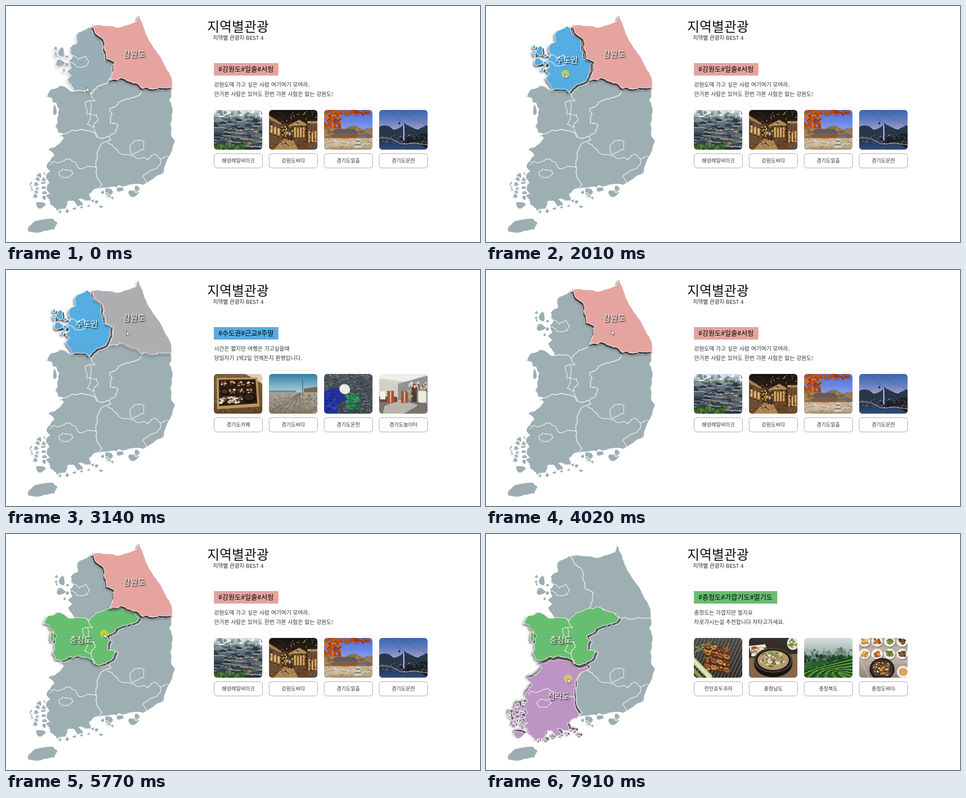
Recreate the animation shown at these times as an HTML page with a canvas. Size 1058 by 529 pixels, loop 7990 ms.

```html
<!DOCTYPE html>
<html lang="ko">
<head>
<meta charset="utf-8">
<title>지역별관광</title>
<style>
html, body { margin: 0; width: 100%; height: 100%; overflow: hidden; background: #fff; }
#stage { position: absolute; left: 0; top: 0; width: 1058px; height: 529px; overflow: hidden; }
svg { position: absolute; left: 0; top: 0; }
canvas { position: absolute; top: 233px; width: 108px; height: 89px; border-radius: 7px; }
text { font-family: "Noto Sans CJK KR", "Noto Sans CJK", "Noto Sans", sans-serif; fill: #222; }
.land { stroke: #fff; stroke-width: 1.2; stroke-linejoin: round; }
.line { fill: none; stroke: #fff; stroke-width: 1.2; stroke-linejoin: round; }
.name { font-size: 17.8px; font-weight: 500; fill: #fff; text-anchor: middle; text-shadow: 2px 2px 3px #000; }
.title { font-size: 29.9px; font-weight: 300; fill: #111; }
.tag { font-size: 15.25px; font-weight: 300; fill: #000; }
.desc { font-size: 12.2px; font-weight: 300; word-spacing: .35px; fill: #333; }
.cap { font-size: 11.4px; font-weight: 300; text-anchor: middle; fill: #333; }
</style>
</head>
<body>
<div id="stage">
  <svg id="svg" width="1058" height="529" viewBox="0 0 1058 529">
    <text class="title" x="449" y="57">지역별관광</text>
    <text x="462" y="76" font-size="12.1">지역별 관광지 BEST 4</text>
    <g id="base"></g><g id="raised"></g><g id="info"></g>
    <circle id="click" r="9" fill="#ffeb00" fill-opacity=".54"/>
    <path id="cursor" d="M0 0V10.5L2.4 8.3L4 12L5.8 11.2L4.2 7.7H7.4Z" fill="#fff" stroke="#333" stroke-width=".8"/>
  </svg>
</div>
<script>
const $ = id => document.getElementById(id);
const LOOP = 7990, GREY = [158, 175, 180], DARK = [105, 102, 102];

let seed = 7;
const rnd = (a = 0, b = 1) => (seed = seed * 16807 % 2147483647, a + (b - a) * seed / 2147483647);
const mix = (a, b, p) => a + (b - a) * p;
const blend = (a, b, p) => `rgb(${a.map((v, i) => Math.round(mix(v, b[i], p)))})`;

function el(parent, name, attrs = {}, text = '') {
  const e = document.createElementNS('http://www.w3.org/2000/svg', name);
  for (const k in attrs) e.setAttribute(k, attrs[k]);
  e.textContent = text;
  parent.appendChild(e);
  return e;
}

// ---- map geometry: a few key points, roughened by midpoint displacement ----
function rough(keys, amp = .3) {
  let p = keys.split(' ').map(s => s.split(',').map(Number));
  for (let pass = 0; pass < 3; pass++) {
    p = p.flatMap((a, i) => {
      const b = p[i + 1];
      if (!b) return [a];
      const dx = b[0] - a[0], dy = b[1] - a[1], k = rnd(-amp, amp) / 2;
      return Math.hypot(dx, dy) < 5 ? [a] : [a, [a[0] + dx / 2 - dy * k, a[1] + dy / 2 + dx * k]];
    });
  }
  return p;
}
const back = a => [...a].reverse();
const join = p => 'M' + p.map(([x, y]) => x.toFixed(1) + ' ' + y.toFixed(1)).join('L');
const ring = (...runs) => join(runs.flat()) + 'Z';
const open = keys => join(rough(keys));

function islet(x, y, rx, ry = rx) {
  const p = [], turn = rnd(0, 6);
  for (let a = 0; a < 6.2; a += .5) {
    const r = 1 + .15 * Math.sin(3 * a + turn);
    p.push([x + rx * r * Math.cos(a), y + ry * r * Math.sin(a)]);
  }
  return ring(p);
}
// A chain of islets between two points.
function chain(n, x1, y1, x2, y2, spread, size) {
  let d = '';
  for (let i = 0; i < n; i++) {
    const f = i / (n - 1);
    d += islet(mix(x1, x2, f) + rnd(-spread, spread), mix(y1, y2, f) + rnd(-3, 3), size * rnd(.7, 1.2), size * rnd(.7, 1.2));
  }
  return d;
}

const sudoGang = rough('187,49 195,61 205,73 215,80 216,97 221,110 222,124 240,131 238,150 233,163 228,172');
const sudoChung = rough('228,172 205,182 190,198 183,191 168,190 152,192', .2);
const gangChung = rough('228,172 245,171 252,166 272,174 288,178 303,190');
const gangGyeong = rough('303,190 312,187 330,190 350,188 368,187');
const chungGyeong = rough('303,190 297,200 276,208 262,211 245,225 231,231 237,242 233,262 250,267 246,277 230,292');
const chungJeolla = rough('230,292 205,294 190,281 165,277 145,279 127,287');
const jeollaGyeong = rough('230,292 234,300 214,309 203,328 202,378 214,400 208,410', .2);
const sudoCoast = rough('152,192 146,177 137,165 147,157 138,150 147,140 142,124 150,114 144,96 160,84 158,66 172,57 187,49');
const gangCoast = rough('187,49 222,49 247,53 288,40 293,24 302,44 317,83 345,124 367,166 368,187', .12);
const chungCoast = rough('127,287 117,285 109,270 116,246 112,218 104,216 103,208 89,204 102,186 122,178 143,190 152,192');
const eastCoast = rough('368,187 370,202 365,211 372,228 368,265 369,290 378,302 369,328 352,374 330,387 306,402 288,399 270,403 243,406 208,410', .2);
const westCoast = rough('127,287 118,291 128,295 104,317 94,321 107,335 90,361 98,370 87,374 96,396 90,412 98,420 89,425 98,445 114,462 130,455 138,438 151,437 158,450 173,446 163,433 190,436 186,422 208,410');

const regions = {
  jeju: { land: ring(rough('49,505 48,497 62,483 104,476 116,486 108,501 66,509 49,505', .12)) },
  gyeong: {
    land: ring(back(gangGyeong), chungGyeong, jeollaGyeong, back(eastCoast)) +
      islet(229, 418, 9, 11) + islet(284, 420, 12, 8) + islet(292, 410, 6, 8) + islet(254, 410, 8, 7) + chain(4, 216, 416, 238, 430, 2, 4),
    lines: open('226,306 238,312 260,333 275,333 292,342 308,340 316,345 328,333 345,343 366,338') +
      open('346,344 333,366 313,375 305,383 314,396') + open('280,333 276,323 288,301 307,303 307,320 289,329 280,333')
  },
  jeolla: {
    land: ring(chungJeolla, westCoast, back(jeollaGyeong)) + islet(77, 446, 11, 8) +
      chain(6, 70, 379, 63, 428, 5, 5) + chain(6, 85, 376, 82, 430, 5, 5) + chain(4, 55, 396, 57, 412, 2, 3) +
      chain(5, 118, 461, 187, 448, 3, 4) + chain(3, 194, 436, 210, 447, 2, 4),
    lines: open('99,356 104,349 126,348 141,342 155,350 160,363 180,360 202,361') +
      open('118,374 126,366 145,368 150,375 138,385 124,384 118,374'),
    shift: [-4, 4], tint: [189, 149, 197], name: ['전라도', 161.5, 369.5]
  },
  chung: {
    land: ring(sudoChung, back(chungCoast), back(chungJeolla), back(chungGyeong), back(gangChung)) + islet(109, 234, 4.5, 12),
    lines: open('190,198 199,212 176,215 181,232 180,243 202,244 206,256 196,272 204,294') + open('196,272 181,265 189,247 190,230 188,214'),
    shift: [-6, -3], tint: [103, 190, 112], name: ['충청도', 166.5, 243.5]
  },
  sudo: {
    land: ring(sudoGang, sudoChung, sudoCoast) + islet(125, 105, 7, 11) + islet(122, 129, 10, 8) + chain(3, 113, 98, 113, 112, 1, 4) + chain(3, 138, 115, 132, 146, 2, 4),
    lines: open('143,117 152,112 163,121 178,113 186,124 181,136 160,138 152,130 144,127'),
    shift: [-5, -4], tint: [85, 173, 225], name: ['수도권', 180, 127.5]
  },
  gang: {
    land: ring(gangCoast, back(gangGyeong), back(gangChung), back(sudoGang)),
    shift: [3, -5], tint: [229, 164, 159], name: ['강원도', 285.5, 113.5]
  }
};

for (const r of Object.values(regions)) {
  const land = g => el(g, 'path', { class: 'land', d: r.land, fill: blend(GREY, GREY, 0) });
  const lines = g => el(g, 'path', { class: 'line', d: r.lines || '' });
  r.base = land($('base'));
  r.lines0 = lines($('base'));
  if (!r.name) continue;
  r.group = el($('raised'), 'g');
  r.body = el(r.group, 'g');
  r.fill = land(r.body);
  lines(r.body);
  const [label, x, y] = r.name;
  r.label = el(r.group, 'text', { class: 'name', x, y }, label);
}

// Lifts a region; the ground it leaves turns dark. p runs from 0 (flat) to 1.
function raise(r, p) {
  const [dx, dy] = r.shift;
  r.base.setAttribute('fill', blend(GREY, DARK, p));
  r.lines0.style.display = p ? 'none' : '';
  r.group.style.display = p ? '' : 'none';
  r.body.setAttribute('transform', `translate(${dx * p} ${dy * p})`);
  r.body.style.filter = `drop-shadow(-2px ${-dy}px 2.5px rgba(40,35,35,${.65 * p}))`;
  r.fill.setAttribute('fill', blend(GREY, r.tint, p * p));
  r.label.style.display = p > .4 ? '' : 'none';
}

// ---- small painted scenes, 108 x 89 ----
let c;
const rect = (col, x, y, w, h) => { c.fillStyle = col; c.fillRect(x, y, w, h); };
const disc = (col, x, y, rx, ry = rx, a = 0) => { c.fillStyle = col; c.beginPath(); c.ellipse(x, y, rx, ry, a, 0, 7); c.fill(); };
const poly = (col, ...p) => {
  c.fillStyle = col; c.beginPath();
  for (let i = 0; i < p.length; i += 2) c.lineTo(p[i], p[i + 1]);
  c.fill();
};
const line = (col, w, x, y, x2, y2) => { c.strokeStyle = col; c.lineWidth = w; c.beginPath(); c.moveTo(x, y); c.lineTo(x2, y2); c.stroke(); };
const times = (n, f) => { for (let i = 0; i < n; i++) f(i); };
const shade = (y, h, ...cols) => {
  const g = c.createLinearGradient(0, y, 0, y + h);
  cols.forEach((k, i) => g.addColorStop(i / (cols.length - 1), k));
  rect(g, 0, y, 108, h);
};
const specks = (cols, n, x, y, w, h, r, ry = r) => {
  cols = cols.split(' ');
  times(n, i => disc(cols[i % cols.length], rnd(x, x + w), rnd(y, y + h), rnd(r * .4, r), rnd(ry * .4, ry), rnd(-.6, .6)));
};
// A ridge of hills down to the bottom edge.
const hills = (col, y, h, f) => {
  c.fillStyle = col; c.beginPath(); c.moveTo(0, 89);
  for (let x = 0; x <= 108; x += 4) c.lineTo(x, y - h * Math.sin(x * f) + rnd(-1, 1));
  c.lineTo(108, 89); c.fill();
};

const scenes = {
  lunch() {
    shade(0, 89, '#7d6038', '#5d4526');
    specks('#8d7146 #4b361d #a0855a', 260, 0, 0, 108, 89, 2, 1);
    poly('#d9cdb8', 70, 0, 108, 0, 108, 22);
    poly('#b9975f', 6, 9, 97, 8, 102, 73, 7, 79);
    poly('#2b1d14', 11, 13, 93, 12, 97, 66, 12, 72);
    times(12, i => specks('#ece0cc #9c4a30 #5a3a24 #c09a66 #33231a', 9, 15 + i % 4 * 20, 17 + (i / 4 | 0) * 17, 12, 9, 3.5, 2.5));
    disc('#17110e', 24, 40, 10, 8); disc('#4d3226', 24, 39, 7, 5);
    disc('#14100e', 79, 54, 14, 11); disc('#35251d', 79, 52, 11, 7);
    specks('#e8dcc8 #c9b699 #5c4935', 60, 15, 53, 42, 12, 4, 3);
  },
  beach() {
    shade(0, 42, '#347da8', '#6fa9c5', '#b0cdd6');
    rect('#5c91a2', 0, 37, 60, 4);
    poly('#6f6a55', 78, 33, 108, 29, 108, 45, 78, 41);
    shade(41, 48, '#aaa294', '#9b9182', '#807666');
    specks('#77705f #b9b0a1 #645c4e', 220, 0, 46, 108, 43, 3, 1);
    times(5, i => line('#71695b', 1.3, 70, 42, i * 17 - 2, 89));
    line('#3b4850', 1.2, 75, 12, 75, 48);
  },
  nets() {
    shade(0, 89, '#4c555b', '#3b4347');
    specks('#737b7d #2b3135 #939999 #59646a', 350, 0, 0, 108, 89, 4, 1);
    specks('#25894f #38a565 #176139 #2d7a5b', 110, 50, 42, 28, 38, 6, 2);
    poly('#24319b', 0, 41, 18, 30, 36, 34, 51, 58, 30, 68, 31, 89, 0, 89);
    specks('#17227a #3344b8 #2a38a8', 25, 3, 42, 24, 42, 7, 3);
    disc('#ecebea', 46, 34, 12, 11, .4);
  },
  museum() {
    shade(0, 89, '#d8d5cf', '#c7c3bb');
    poly('#efeeeb', 0, 0, 108, 0, 60, 18, 0, 10);
    poly('#8f9493', 42, 22, 108, 4, 108, 69, 42, 57);
    poly('#78756f', 0, 62, 44, 56, 108, 68, 108, 89, 0, 89);
    poly('#b8b5ad', 12, 72, 44, 57, 88, 70, 55, 89, 8, 89);
    rect('#6d4b36', 0, 51, 40, 12); rect('#f4f2ec', 2, 39, 12, 18);
    times(2, i => { rect('#ae5039', 18 + i * 31, 38, 15, 27); rect('#dfb7a0', 24 + i * 31, 39, 3, 25); });
    rect('#493b33', 72, 28, 12, 35);
    specks('#c9ac86 #774e38 #e4d8c4', 45, 65, 20, 40, 32, 3, 4);
    rect('#ede9df', 87, 38, 18, 26); line('#7c603f', 1.4, 88, 62, 84, 84); line('#7c603f', 1.4, 101, 64, 106, 86);
  },
  roofs() {
    shade(0, 89, '#d1dce4', '#687582', '#3d4855', '#28323d');
    specks('#eef2f4 #9ba9b4 #c2cbd1 #768794', 80, 0, 3, 108, 12, 5, 4);
    specks('#46633c #628052', 30, 0, 15, 108, 7, 5, 2);
    times(75, i => {
      const y = 19 + i * .8, x = rnd(-12, 100), w = 7 + i * .1;
      poly('#a8aaa5', x + 2, y + 3, x + w * 2, y + 5, x + w * 2, y + 7, x + 2, y + 6);
      poly(['#344150', '#4c5968', '#283341', '#5f6b78'][i % 4], x, y + 4, x + w * .5, y - 1, x + w * 1.8, y, x + w * 2, y + 5);
    });
    specks('#c48950 #dfb873 #93623b', 45, 25, 42, 83, 42, 3, 1.5);
    specks('#3d612e #5a8040 #284a27', 70, 0, 74, 70, 15, 5, 4);
  },
  street() {
    shade(0, 89, '#171310', '#382719', '#6c492b');
    poly('#6b4d32', 0, 17, 28, 31, 28, 72, 0, 82); poly('#a8804f', 0, 12, 28, 30, 28, 34, 0, 20);
    times(3, i => rect('#dfb36a', 3 + i * 8, 35 + i * 3, 5, 16));
    rect('#4a3524', 31, 30, 24, 34); specks('#e0b25f #84592f #edce8a', 34, 28, 34, 30, 25, 2, 3);
    poly('#b28b58', 51, 31, 67, 22, 84, 31, 84, 35, 51, 35);
    rect('#674629', 54, 35, 28, 42);
    times(4, i => rect('#d9aa60', 56 + i * 6.5, 39, 4, 22));
    rect('#6b4b32', 86, 28, 22, 55); rect('#c39a61', 86, 25, 22, 5);
    times(3, i => rect('#d3a663', 88 + i * 7, 47, 4, 25));
    poly('#b18656', 32, 65, 54, 65, 65, 89, 10, 89);
    specks('#3a2a1c #8d6740 #251b14', 90, 0, 24, 108, 62, 3, 1.5);
    specks('#fff0bc #f1c773', 25, 15, 4, 90, 23, 1.2);
    specks('#252130 #333d51', 5, 47, 58, 6, 10, 2, 5);
  },
  autumn() {
    shade(0, 55, '#4f6fd2', '#6b89e3', '#9cabe4');
    hills('#8b704b', 40, 5, .12);
    specks('#ad793c #686441 #bd8747', 80, 0, 43, 108, 15, 5, 3);
    poly('#525d69', 15, 51, 25, 43, 67, 43, 78, 52); rect('#855b42', 21, 51, 52, 12);
    poly('#646d75', 77, 58, 83, 52, 108, 55, 108, 62); rect('#85604a', 83, 61, 25, 9);
    shade(63, 26, '#c6ad8c', '#d1bfa5', '#a78f70');
    specks('#a3957c #ded1bb #8c8167', 70, 0, 64, 108, 25, 5, 1.2);
    times(5, i => rect(i % 2 ? '#8b8880' : '#d9d5cb', 68 + i, 80 - i * 4, 15 - i * 2, 4));
    specks('#c74a13 #a9501b #993411 #d8701e', 120, 0, 0, 38, 40, 5, 3);
    specks('#c74a13 #a9501b #993411', 50, 35, 0, 64, 12, 5, 3);
  },
  night() {
    shade(0, 50, '#3766ae', '#667fc1', '#b5a5c9');
    hills('#253748', 39, 5, .13);
    shade(59, 30, '#29364a', '#243c64', '#314f7a');
    poly('#17202d', 45, 64, 108, 51, 108, 89, 85, 72, 55, 75);
    c.strokeStyle = '#ca9a69'; c.lineWidth = 1.5; c.beginPath(); c.moveTo(0, 63); c.bezierCurveTo(45, 58, 30, 84, 74, 74); c.lineTo(108, 78); c.stroke();
    specks('#efc183 #d68a50 #f4deb0', 75, 2, 55, 104, 20, 1.2, .8);
    line('#b86dd2', 3, 55, 35, 55, 69); line('#f0d8f7', 1.4, 55, 31, 55, 69);
    line('#445577', .7, 23, 0, 59, 34); line('#445577', .7, 42, 0, 108, 36);
    times(2, i => disc('#1b293c', 45 + i * 12, 30 + i * 3, 2, 2.7));
  },
  grill() {
    shade(0, 89, '#4c4a46', '#292928');
    times(22, i => line('#888680', 1.2, i * 8 - 45, 89, i * 8 - 5, 0));
    specks('#6c8c3d #a4bb63', 14, 4, 12, 35, 18, 9, 2);
    times(16, i => {
      const x = 31 + i % 4 * 14, y = 18 + (i / 4 | 0) * 15 + i % 4 * 3;
      disc('#5a2c18', x, y + 2, 9, 7, .5); disc(['#a56032', '#c4854c', '#7d4121'][i % 3], x, y, 8, 5, .5);
      line('#4a2717', 1.2, x - 5, y - 2, x + 5, y + 2);
    });
    specks('#e5bc78 #4a2818 #c9884a', 60, 26, 14, 54, 57, 3, 1.6);
    line('#c8d69c', 12, -4, 47, 38, 90); line('#eef0cf', 3, 0, 50, 35, 88); line('#7e9d4d', 8, -2, 70, 18, 92);
  },
  stew() {
    shade(0, 89, '#37302b', '#25201d');
    poly('#88664a', 0, 45, 108, 35, 108, 89, 0, 89);
    poly('#eee9df', 0, 18, 36, 14, 44, 34, 6, 42); specks('#b88a52 #7d4f34 #dabb7d', 28, 5, 20, 32, 15, 4, 2.5);
    disc('#e8e2d6', 98, 12, 13, 15); specks('#638446 #a9b868', 20, 90, 4, 17, 18, 4, 3);
    disc('#151412', 54, 57, 43, 31); disc('#454039', 54, 50, 43, 28);
    disc('#1e1b18', 54, 50, 39, 25); disc('#b59a6b', 54, 50, 35, 22);
    specks('#eee7d3 #789149 #c2ad7b #766145', 100, 28, 34, 50, 30, 4, 2.5);
    line('#6e9b4e', 4, 47, 32, 62, 40);
  },
  tea() {
    shade(0, 89, '#d6dfde', '#a9b9b5', '#315d3a', '#1c4b20');
    specks('#718c80 #587969 #9db0a8', 55, 0, 26, 108, 18, 5, 7);
    specks('#214833 #365d40 #183b29', 80, 0, 40, 108, 14, 4, 6);
    poly('#28622b', 0, 61, 35, 51, 72, 56, 108, 39, 108, 89, 0, 89);
    times(12, i => {
      c.strokeStyle = i % 2 ? '#5d9a35' : '#173f20'; c.lineWidth = 3.2;
      c.beginPath(); c.moveTo(i * 11 - 25, 91); c.bezierCurveTo(i * 6 - 4, 72, 42 + i * 3, 64 + i, 112, 43 + i * 4); c.stroke();
    });
    specks('#7eb44a #1d5426 #3d8131', 110, 0, 61, 108, 28, 2, 1);
  },
  table() {
    shade(0, 89, '#afa69b', '#c5bbb0', '#8c8177');
    times(9, i => line('#948b81', .8, 0, i * 11, 108, i * 11 - 7));
    const foods = ['#c5843d #e5b660', '#a7502b #d48a40', '#5c7137 #87914e', '#4c3528 #8d6542'];
    times(8, i => {
      const x = 12 + i % 4 * 28, y = i < 4 ? 8 : 36;
      disc('#7f7770', x + 1, y + 2, 12.5, 11.5); disc('#f4f0e9', x, y, 12.5, 11.5);
      specks(foods[i % 4], 18, x - 6, y - 5, 12, 10, 4);
    });
    disc('#211e1d', 51, 70, 28, 25); disc('#3a3431', 51, 69, 24, 21);
    specks('#ead9bd #a23d26 #55713e #d7a252 #75462d', 55, 34, 55, 34, 28, 5, 3);
    disc('#f4f0e9', 98, 76, 14, 13); disc('#dfa15b', 98, 76, 10, 9);
    line('#d3cbc1', 1.5, 5, 54, 22, 89);
  }
};

// ---- right-hand panels ----
const panels = {
  gang: { w: 144, tag: '#강원도#일출#서핑',
    desc: ['강원도에 가고 싶은 사람 여기여기 모여라.', '안가본 사람은 있어도 한번 가본 사람은 없는 강원도!'],
    cards: { roofs: '해양레일바이크', street: '강원도바다', autumn: '경기도일출', night: '경기도온천' } },
  sudo: { w: 144, tag: '#수도권#근교#주말',
    desc: ['시간은 짧지만 여행은 가고싶을때', '당일치기 1박2일 언제든지 환영입니다.'],
    cards: { lunch: '경기도카페', beach: '경기도바다', nets: '경기도온천', museum: '경기도놀이터' } },
  chung: { w: 186, tag: '#충청도#가깝기도#멀기도',
    desc: ['충청도는 가깝지만 멀지요', '차로가시는걸 추천합니다 차타고가세요.'],
    cards: { grill: '천안호두과자', stew: '충청남도', tea: '충청북도', table: '충청도바다' } }
};

for (const [key, p] of Object.entries(panels)) {
  const g = el($('info'), 'g');
  el(g, 'rect', { x: 464, y: 128, width: p.w, height: 28, fill: `rgb(${regions[key].tint})` });
  el(g, 'text', { class: 'tag', x: 474, y: 147 }, p.tag);
  p.desc.forEach((s, i) => el(g, 'text', { class: 'desc', x: 464.5, y: 180.5 + 21.3 * i }, s));
  p.parts = [g];
  Object.entries(p.cards).forEach(([scene, caption], i) => {
    const x = 464.5 + 122.8 * i, cv = document.createElement('canvas');
    cv.width = 108; cv.height = 89; cv.style.left = Math.round(x - .3) + 'px';
    c = cv.getContext('2d');
    scenes[scene]();
    $('stage').appendChild(cv);
    p.parts.push(cv);
    el(g, 'rect', { x, y: 331, width: 108, height: 32, rx: 6, fill: '#fff', stroke: '#999' });
    el(g, 'text', { class: 'cap', x: x + 54, y: 351 }, caption);
  });
}

// ---- timeline ----
// Cursor moves: start, end, x, y.
const moves = [[0, 402, 177, 152], [2881, 3216, 280, 135], [4690, 5092, 219, 223], [6440, 6767, 197, 299], [6767, 7102, 183, 324]];
const clicks = [[2010, 2150], [3880, 4020], [5770, 5840], [7910, LOOP]];
// Each rise: start, fully up, dropped back.
const rises = {
  sudo: [[-170, 402, 4020]],
  gang: [[-400, -60, 2080], [3040, 3270, 5840]],
  chung: [[4800, 5092, LOOP]],
  jeolla: [[6800, 7102, LOOP]]
};
const ramp = (t, a, b) => Math.min(1, Math.max(0, (t - a) / (b - a)));
const smooth = f => f * f * (3 - 2 * f);

function cursorAt(t) {
  let x = 180, y = 182;
  for (const [a, b, x2, y2] of moves) {
    const f = smooth(ramp(t, a, b));
    x = mix(x, x2, f); y = mix(y, y2, f);
  }
  return `translate(${x} ${y})`;
}

function render(t) {
  const q = Math.min(LOOP, Math.floor((t + 10) / 67) * 67);   // motion is stepped at about 15 fps
  for (const key in rises) {
    const r = rises[key].find(([a, , off]) => q >= a && t < off);
    raise(regions[key], r ? ramp(q, r[0], r[1]) : 0);
  }
  const shown = t < 2080 ? 'gang' : t < 4020 ? 'sudo' : t < 5840 ? 'gang' : 'chung';
  for (const key in panels) panels[key].parts.forEach(e => e.style.display = key === shown ? '' : 'none');
  const at = cursorAt(q);
  $('cursor').setAttribute('transform', at);
  $('click').setAttribute('transform', at);
  $('click').style.display = clicks.some(([a, b]) => t >= a && t < b) ? '' : 'none';
}

const start = performance.now();
function tick() {
  render((performance.now() - start) % LOOP);
  requestAnimationFrame(tick);
}
tick();
</script>
</body>
</html>
```
